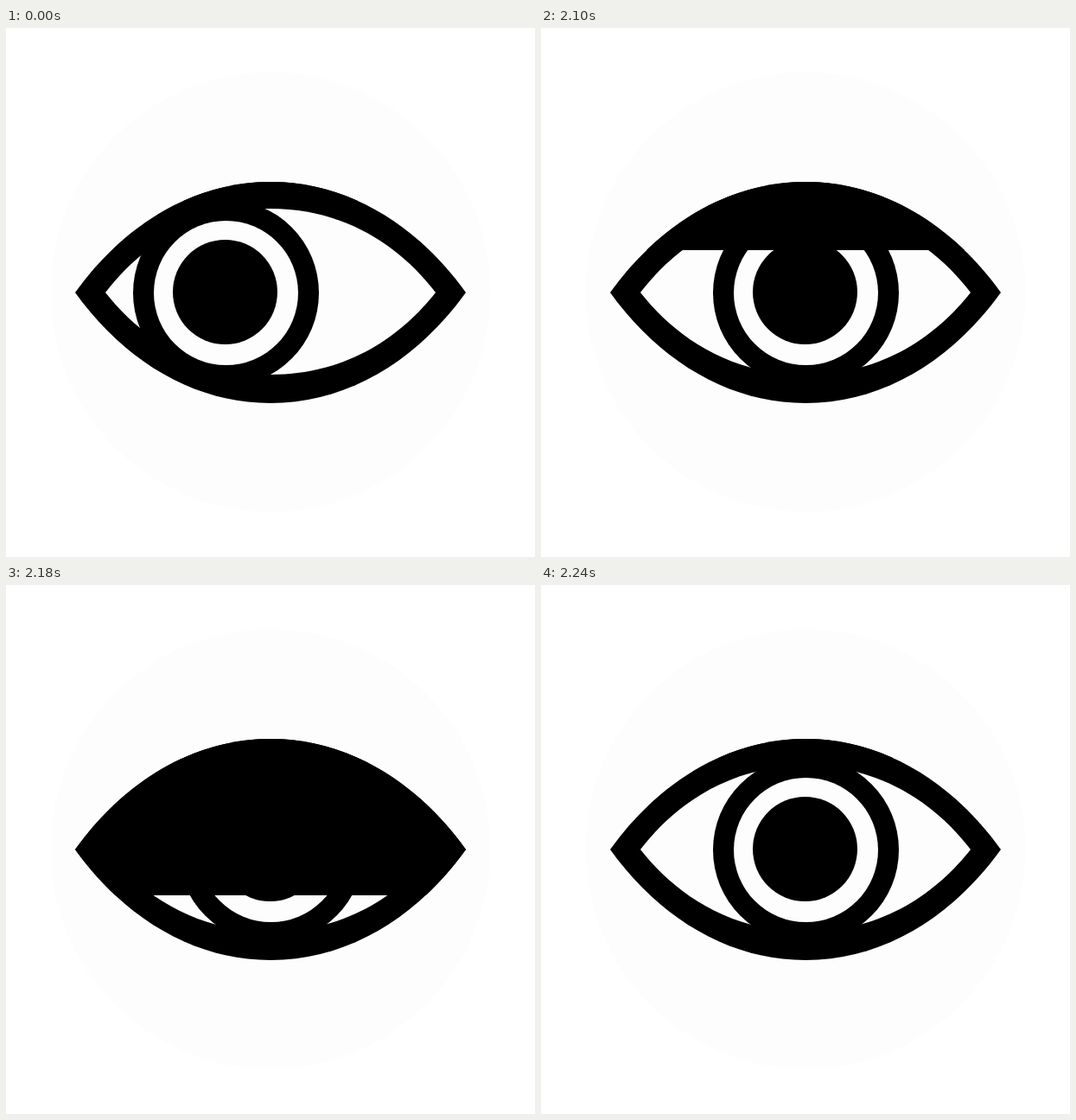
Recreate the animation shown at these times as an HTML page without scripts. Size 612x612 px, loop 7.24 s.

```html
<!DOCTYPE html>
<html lang="en">
<head>
<meta charset="utf-8">
<title>Blinking eye</title>
<style>
  html, body { margin: 0; width: 100%; height: 100%; overflow: hidden; background: #fff; }
  svg { display: block; width: 100%; height: 100%; }
  .pale { fill: #fdfdfd; }
  .iris, .lid { animation: look 7240ms step-end infinite; }
  .lid { animation-name: blink; }

  @keyframes look {
    0% { transform: translateX(-52px); }
    8.287% { transform: translateX(51px); }
    16.574%, 100% { transform: none; }
  }
  /* The lid drops and rises in 20 ms steps. */
  @keyframes blink {
    0% { transform: none; }
    29.005% { transform: translateY(57px); }
    29.281% { transform: translateY(110px); }
    29.557% { transform: translateY(159px); }
    29.834% { transform: translateY(212px); }
    30.11% { transform: translateY(159px); }
    30.386% { transform: translateY(110px); }
    30.662% { transform: translateY(57px); }
    30.939%, 100% { transform: none; }
  }
</style>
</head>
<body>
<svg viewBox="0 0 612 612">
  <defs>
    <path id="outline" d="M80 306C136 228 216 178 306 178S476 228 532 306C476 384 396 434 306 434S136 384 80 306Z"/>
    <clipPath id="eye"><use href="#outline"/></clipPath>
  </defs>
  <circle class="pale" cx="306" cy="305.5" r="254.5"/>
  <use href="#outline"/>
  <path class="pale" d="M115 306C152 258 214 209 306 209S460 258 497 306C460 353 398 401 306 401S152 353 115 306Z"/>
  <g clip-path="url(#eye)">
    <g class="iris">
      <circle cx="306.5" cy="306.5" r="107.5"/>
      <circle class="pale" cx="306.5" cy="306.5" r="83.5"/>
      <circle cx="305.5" cy="305.5" r="60.5"/>
    </g>
    <rect class="lid" y="-100" width="612" height="300"/>
  </g>
</svg>
</body>
</html>
```
